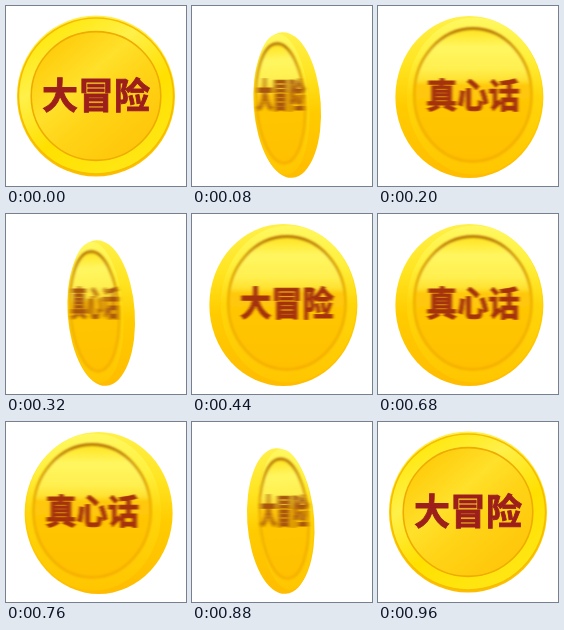
Write an HTML page that moves like this. It is 180 px wide and 180 px high and loops after 3000 ms.

```html
<!DOCTYPE html>
<html lang="zh">
<head>
<meta charset="utf-8">
<title>Coin flip</title>
<style>
  html, body { margin: 0; width: 100%; height: 100%; overflow: hidden; background: #fff; }
  svg { display: block; width: 100vw; height: 100vh; }
  text {
    font: 900 36px "Noto Sans CJK SC", "Noto Sans CJK", sans-serif;
    text-anchor: middle; stroke-width: .9;
  }
</style>
</head>
<body>
<svg viewBox="0 0 180 180">
  <defs>
    <linearGradient id="edge" x1="0" y1="0" x2="0" y2="1">
      <stop offset="0" stop-color="#fff04a"/>
      <stop offset=".3" stop-color="#ffe420"/>
      <stop offset=".55" stop-color="#ffcc00"/>
      <stop offset="1" stop-color="#ffbc00"/>
    </linearGradient>
    <linearGradient id="ring" x1="0" y1="0" x2="0" y2="1">
      <stop offset="0" stop-color="#fff860"/>
      <stop offset=".25" stop-color="#fff03c"/>
      <stop offset=".5" stop-color="#ffd60a"/>
      <stop offset="1" stop-color="#ffc600"/>
    </linearGradient>
    <linearGradient id="ringStill" x1=".2" y1="0" x2=".8" y2="1">
      <stop offset="0" stop-color="#ffe600"/>
      <stop offset=".3" stop-color="#fff04a"/>
      <stop offset=".6" stop-color="#ffe000"/>
      <stop offset="1" stop-color="#ffe818"/>
    </linearGradient>
    <linearGradient id="face" x1="0" y1="0" x2="0" y2="1">
      <stop offset="0" stop-color="#ffe21c"/>
      <stop offset=".14" stop-color="#fff660"/>
      <stop offset=".3" stop-color="#fff050"/>
      <stop offset=".39" stop-color="#ffe030"/>
      <stop offset=".43" stop-color="#ffc808"/>
      <stop offset="1" stop-color="#ffc000"/>
    </linearGradient>
    <linearGradient id="groove" x1="0" y1="0" x2="0" y2="1">
      <stop offset="0" stop-color="#b06400"/>
      <stop offset=".15" stop-color="#d09400"/>
      <stop offset=".45" stop-color="#eeb000"/>
      <stop offset="1" stop-color="#f6ae00"/>
    </linearGradient>
    <linearGradient id="faceStill" x1=".15" y1=".1" x2=".85" y2=".9">
      <stop offset="0" stop-color="#ffcb0a"/>
      <stop offset=".35" stop-color="#ffe02a"/>
      <stop offset=".6" stop-color="#ffd316"/>
      <stop offset="1" stop-color="#ffc60a"/>
    </linearGradient>
    <filter id="soft"><feGaussianBlur stdDeviation=".9"/></filter>
    <filter id="smear" x="-20%" y="-20%" width="140%" height="140%">
      <feGaussianBlur id="blur" stdDeviation="0 0"/>
    </filter>
  </defs>
  <g id="coin">
    <rect id="body" fill="url(#edge)"/>
    <ellipse id="rim"/>
    <ellipse id="inner"/>
  </g>
  <g id="label"><text id="word" y="13.5"></text></g>
</svg>
<script>
const LOOP = 3000, STEP = 40, LAST_STEP = 24, TURN = 30;
const WORDS = ["大冒险", "真心话"];

// Coin shape by how far it is turned away from the viewer
const POSES = {
  0:  { rx: 79, ry: 80.5, depth: 0, tilt: 0, text: 1, smear: 0, ink: "#9c1f1c" },
  30: { rx: 69, ry: 81, depth: 5, tilt: 0, text: .87, smear: 2, ink: "#a4300c" },
  60: { rx: 28.5, ry: 73, depth: 5, tilt: -4, text: .44, smear: 4.5, ink: "#a8540a" },
  90: { rx: 4, ry: 73, depth: 6, tilt: -4, text: 0, smear: 0, ink: "none" }
};

const el = id => document.getElementById(id);
const set = (id, attrs) => {
  for (const key in attrs) el(id).setAttribute(key, attrs[key]);
};

function draw(time) {
  const step = Math.min(Math.floor(time % LOOP / STEP), LAST_STEP);
  const angle = step * TURN;
  const halfTurns = Math.round(angle / 180);
  const phi = angle - halfTurns * 180;
  const pose = POSES[Math.abs(phi)];
  const still = phi === 0;
  const visibility = pose.text ? "visible" : "hidden";
  const { rx, ry, depth } = pose;

  const cx = (still ? 90 : 92) + 5 * Math.sin(phi * Math.PI / 180) ** 3;
  const cy = still ? 90 : 172 - ry;
  const front = cx - Math.sign(phi) * depth;
  const faceX = still ? front : front - 1.5;

  set("coin", { transform: `rotate(${pose.tilt} ${cx} ${cy})` });
  set("body", {
    x: cx - rx - depth, y: cy - ry, rx: rx + depth, ry,
    width: 2 * (rx + depth), height: 2 * ry
  });
  set("rim", {
    cx: front, cy: still ? cy : cy - 1, rx: rx - 1.5, ry: ry - 2.5,
    fill: still ? "url(#ringStill)" : "url(#ring)",
    stroke: still ? "#f6bd00" : "none", "stroke-width": 1.5
  });
  set("inner", {
    cx: faceX, cy: still ? 90 : cy - 2,
    rx: rx * (still ? .82 : .85), ry: ry * (still ? .8 : .82),
    fill: still ? "url(#faceStill)" : "url(#face)",
    stroke: still ? "#efac00" : "url(#groove)",
    "stroke-width": still ? 1.6 : 2.6,
    filter: still ? "none" : "url(#soft)",
    visibility
  });
  set("label", {
    transform: `translate(${faceX} 89.5) scale(${pose.text || .01} ${still ? 1 : .95})`,
    visibility
  });
  set("blur", { stdDeviation: `${pose.smear} 0.2` });
  set("word", {
    fill: pose.ink, stroke: pose.ink,
    filter: pose.smear ? "url(#smear)" : "none"
  });
  el("word").textContent = WORDS[halfTurns % 2];
}

const start = performance.now();
function tick() {
  draw(performance.now() - start);
  requestAnimationFrame(tick);
}
tick();
</script>
</body>
</html>
```
